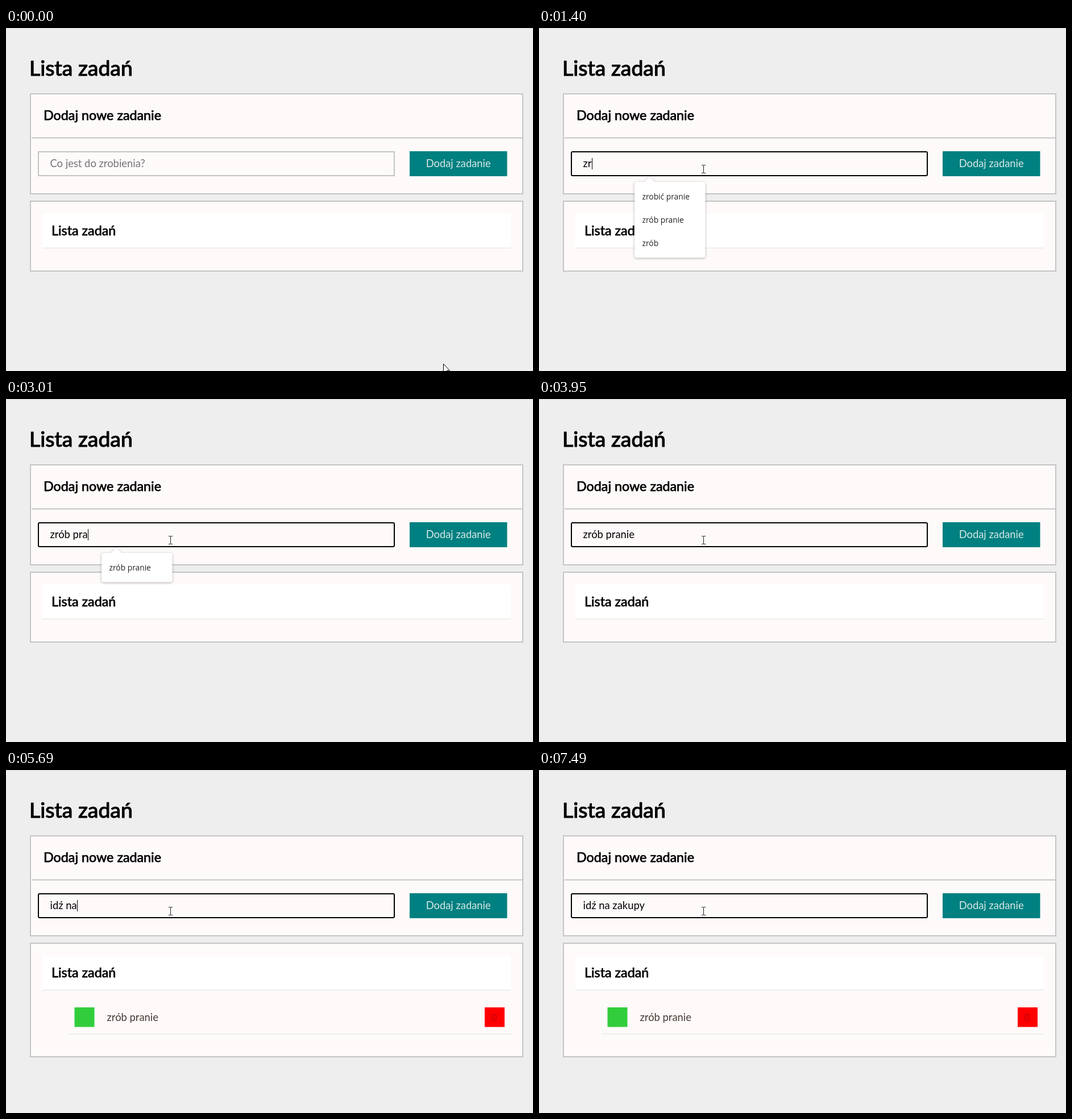
An HTML page that plays this animation: 927x604 px, repeating every 8 s.

```html
<!DOCTYPE html>
<html lang="pl">
<head>
<meta charset="utf-8">
<title>Lista zadań</title>
<style>
  html, body { margin: 0; width: 100%; height: 100%; overflow: hidden; background: #eee; }
  svg { display: block; width: 927px; height: 604px; }
  text { font-family: Lato, sans-serif; font-size: 18.4px; white-space: pre; }
  .head { stroke: #000; stroke-linejoin: round; }
  .h1 { font-size: 37.4px; stroke-width: 1.2px; }
  .h2 { font-size: 23.3px; stroke-width: .75px; }
  .card { fill: snow; stroke: #c4c4c4; stroke-width: 2; }
  #menu text { font-family: "Open Sans", sans-serif; font-size: 13.8px; fill: #222; }
  #panel { filter: drop-shadow(0 1px 2px rgba(0, 0, 0, .3)); }
</style>
</head>
<body>
<svg viewBox="0 0 927 604">
  <rect width="927" height="604" fill="#eee"/>
  <rect width="927" height="1" fill="#dadada"/>
  <text class="head h1" x="41" y="83.5">Lista zadań</text>

  <rect class="card" x="43" y="116" width="866" height="176"/>
  <rect x="45" y="192.5" width="863" height="2" fill="#c4c4c4"/>
  <text class="head h2" x="66" y="161.5">Dodaj nowe zadanie</text>
  <rect id="field" x="57" y="218" width="626" height="42" fill="snow" stroke-width="2"/>
  <text id="hint" x="77.5" y="245" fill="#757575">Co jest do zrobienia?</text>
  <text id="typed" x="77.5" y="245"></text>
  <rect id="caret" y="229" width="1" height="20"/>
  <rect x="710" y="217" width="171.5" height="44" fill="teal"/>
  <text x="795.7" y="245" text-anchor="middle" fill="#d9e6e6">Dodaj zadanie</text>

  <rect id="list" class="card" x="43" y="305" width="866"/>
  <rect x="64" y="326" width="824" height="61" fill="#fff"/>
  <rect x="64" y="386.5" width="824" height="2" fill="#eee"/>
  <text class="head h2" x="80" y="364.5">Lista zadań</text>
  <g id="task">
    <rect x="120.5" y="418" width="35" height="34.5" fill="#32cd3c"/>
    <text x="177.5" y="442" fill="#453a34">zrób pranie</text>
    <rect x="842" y="418" width="35" height="34.5" fill="red"/>
    <path d="M853.5 431.5h10M857 431v-1.500h3v1.500M854.500 432v9.500h8v-9.500M857 434v5.500M860 434v5.500" fill="none" stroke="#c4000c"/>
    <rect x="110" y="464" width="778" height="2" fill="#eee"/>
  </g>

  <g id="menu">
    <g id="panel">
      <path d="M184 271.500L194 262L204 271.500Z" fill="#fff"/>
      <rect id="sheet" x="168" y="271" width="124.500" rx="4" fill="#fff"/>
    </g>
    <g id="rows"></g>
  </g>

  <circle id="glow" cx="287" cy="247" r="13.5" fill="#fdf57c"/>
  <path id="arrow" d="M.5 .5V16.500L4.200 13L6.800 19L9 18L6.500 12.200H11.500Z" fill="#fff" stroke="#000"/>
  <path id="beam" d="M-3 -6.500H-1L0.500 -6L2 -6.500H4M.5 -6V7M-3 7.500H-1L.5 7L2 7.500H4" fill="none" stroke="#222"/>
</svg>
<script>
const LOOP = 8000, FOCUS = 940, SUBMIT = 4000, BLINK = 530;
const words = ["zadanie", "zrobić pranie", "zrób pranie", "zrób"];
const entries = [
  { text: "zrób pranie", at: [1200, 1400, 1730, 1860, 2460, 2660, 2790, 3010, 3130, 3280, 3420] },
  { text: "idź na zakupy", at: [4810, 4950, 5220, 5490, 5590, 5690, 5820, 5880, 6090, 6220, 6350, 6550, 6960] }
];
const $ = id => document.getElementById(id);
const show = (id, on) => $(id).setAttribute("display", on ? "inline" : "none");
const set = (id, name, value) => $(id).setAttribute(name, value);

const rows = words.map((_, i) => {
  const row = document.createElementNS("http://www.w3.org/2000/svg", "text");
  row.setAttribute("x", 181.5);
  row.setAttribute("y", 302 + 41 * i);
  $("rows").append(row);
  return row;
});

// The pointer moves in seven jumps, slowing down, then settles on the field.
function pointer(t) {
  if (t >= 670) return [289, 248];
  if (t < 70) return [769, 591];
  const step = Math.min(7, 1 + Math.floor((t - 70) / (460 / 6) + 1e-6));
  if (step === 7) return [288, 248];
  const k = 1 - (1 - step / 6) ** 1.8;
  return [769 - 487 * k, 591 - 354 * k].map(Math.round);
}

function drawPointer(t) {
  const [x, y] = pointer(t);
  const inField = x > 56 && x < 684 && y > 217 && y < 261;
  show("arrow", !inField);
  show("beam", inField);
  set(inField ? "beam" : "arrow", "transform", `translate(${x} ${y})`);
  show("glow", t >= FOCUS && t < 1000);
}

function drawField(t) {
  const { text, at } = entries[t < SUBMIT ? 0 : 1];
  const count = at.filter(k => k <= t).length;
  const value = text.slice(0, count);
  const keys = entries.flatMap(e => e.at).filter(k => k <= t);
  const last = keys.length ? keys[keys.length - 1] : FOCUS;
  const focused = t >= FOCUS;

  set("field", "stroke", focused ? "#000" : "#c4c4c4");
  set("field", "rx", focused ? 2 : 0);
  show("hint", !value);
  $("typed").textContent = value;
  const end = 77.5 + (value ? $("typed").getComputedTextLength() : 0);
  set("caret", "x", Math.round(end));
  show("caret", focused && (t - last) % (2 * BLINK) < BLINK);
  return value;
}

function drawMenu(t, value) {
  const open = t >= FOCUS && t < 3620;
  show("menu", open);
  if (!open) return;
  const found = words.filter(w => w.startsWith(value));
  const fade = t < 3480 ? 1 : t < 3550 ? .66 : .33;
  set("menu", "opacity", fade);
  set("sheet", "height", 10.5 + 41 * found.length);
  rows.forEach((row, i) => { row.textContent = found[i] || ""; });
}

function draw(t) {
  const added = t >= SUBMIT;
  set("list", "height", added ? 200 : 123);
  show("task", added);
  drawMenu(t, drawField(t));
  drawPointer(t);
}

const start = performance.now();
function tick() {
  draw((performance.now() - start) % LOOP);
  requestAnimationFrame(tick);
}
tick();
</script>
</body>
</html>
```
